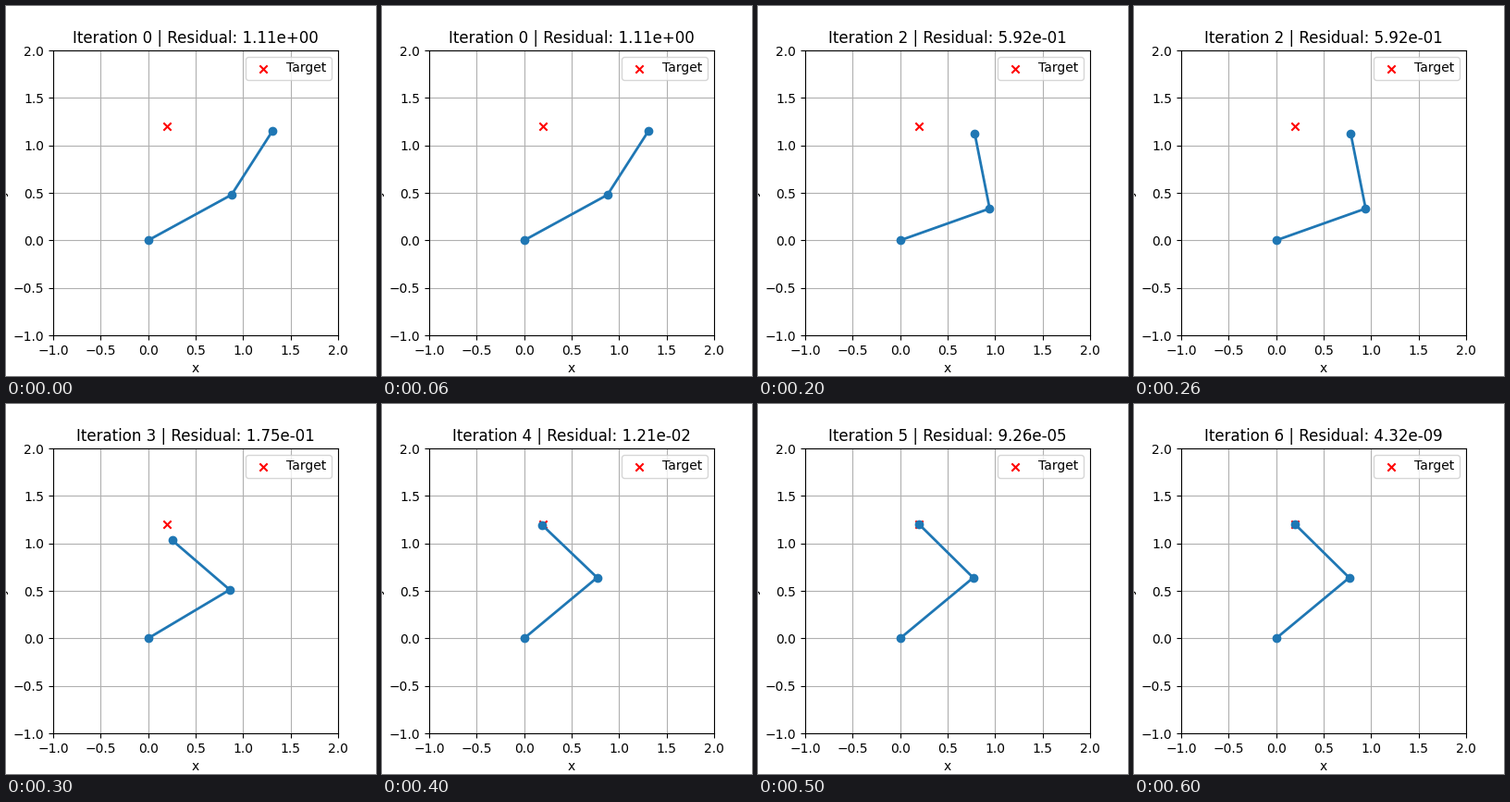
Recreate the animation shown at these times as a matplotlib script. Size 400 px wide and 400 px high, loop 0.7 s.

```python
import numpy as np
import matplotlib.pyplot as plt
from matplotlib.animation import FuncAnimation

L1, L2 = 1.0, 0.8
GOAL = np.array([0.2, 1.2])
STEPS = 7


def joints(q):
    """Base, elbow and tip of the two-link arm."""
    a, b = q[0], q[0] + q[1]
    elbow = np.array([L1 * np.cos(a), L1 * np.sin(a)])
    tip = elbow + np.array([L2 * np.cos(b), L2 * np.sin(b)])
    return np.array([[0.0, 0.0], elbow, tip])


def jacobian(q):
    a, b = q[0], q[0] + q[1]
    return np.array([
        [-L1 * np.sin(a) - L2 * np.sin(b), -L2 * np.sin(b)],
        [L1 * np.cos(a) + L2 * np.cos(b), L2 * np.cos(b)],
    ])


def newton(q, steps):
    """Poses visited by Newton's method on the tip position."""
    path = [q]
    for _ in range(steps - 1):
        q = q - np.linalg.solve(jacobian(q), joints(q)[2] - GOAL)
        path.append(q)
    return path


poses = [joints(q) for q in newton(np.array([0.5, 0.5]), STEPS)]

fig, ax = plt.subplots(figsize=(4, 4), dpi=100)
ax.set_xlim(-1, 2)
ax.set_ylim(-1, 2)
ax.set_aspect("equal")
ax.grid(True)
ax.set_xlabel("x")
ax.set_ylabel("y")
arm, = ax.plot([], [], "o-", lw=2)
ax.scatter(*GOAL, color="red", marker="x", label="Target")
ax.legend(loc="upper right")
title = ax.set_title("")


def update(i):
    pts = poses[i]
    residual = np.linalg.norm(pts[2] - GOAL)
    arm.set_data(pts[:, 0], pts[:, 1])
    title.set_text(f"Iteration {i} | Residual: {residual:.2e}")
    return arm, title


anim = FuncAnimation(fig, update, frames=STEPS, interval=100, repeat=True)
plt.show()
```
